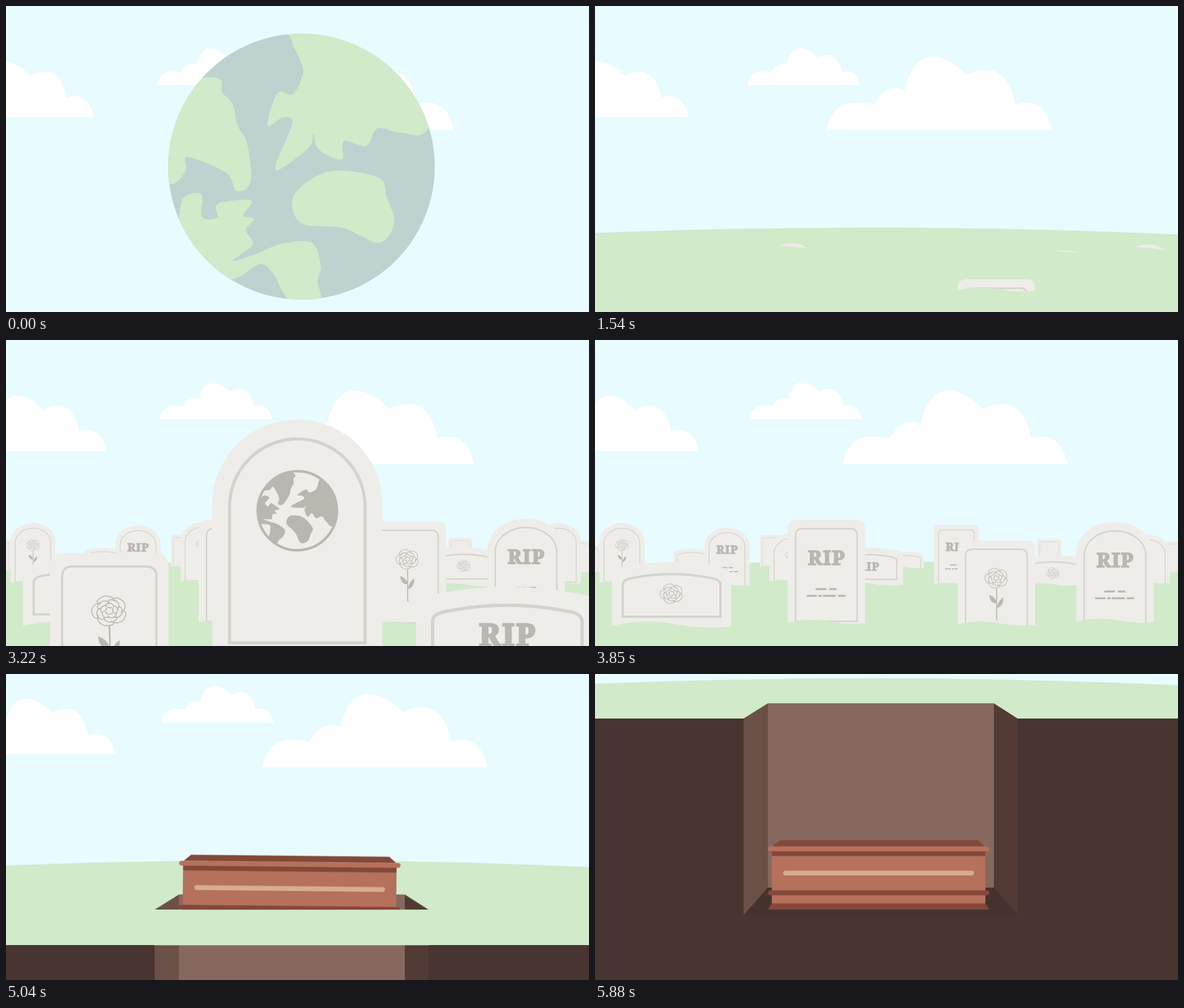
Recreate the animation shown at these times as an HTML page. Size 1032 px wide and 543 px high, loop 6.09 s.

```html
<!DOCTYPE html>
<html lang="en">
<head>
<meta charset="utf-8">
<title>Burial</title>
<style>
html, body { margin: 0; width: 100%; height: 100%; overflow: hidden; background: #e8fbff; }
svg { display: block; width: 100%; height: 100%; }
:root { --ease: cubic-bezier(.5, 0, .5, 1); }
.ground, .pan, .slide, .strip, .stone { animation: 6090ms var(--ease) infinite both; }
.ground { animation-name: ground; }
.pan { animation-name: pan; }
.slide { animation-name: slide; }
.strip { animation-name: strip; }
.back { animation-name: back; animation-delay: var(--wait); }
.front { animation-name: front; animation-delay: var(--wait); }
.drift { animation: drift 6090ms linear infinite; }
.coffin { animation: coffin 6090ms ease-out infinite; }
.rip { font: 700 35px "Noto Serif", "Liberation Serif", serif; letter-spacing: 2px; text-anchor: middle; fill: #b9b8b0; stroke: #b9b8b0; stroke-width: 2.2; }
.rose { fill: none; stroke: #b9b8b0; stroke-width: 1.1; }
.leaf { fill: #b9b8b0; stroke: none; }

@keyframes ground {
  0% { transform: translate(523px, 49px) scale(1) translate(0px, 236px) rotate(0deg); }
  20.69%, 76.8% { transform: translate(485px, 393.5px) scale(52) translate(0px, 236px) rotate(-35deg); }
  96.55%, 100% { transform: translate(485px, 8px) scale(52) translate(0px, 236px) rotate(-35deg); }
}
@keyframes pan {
  0%, 77.42% { transform: translateY(0); }
  96.55%, 100% { transform: translateY(var(--up)); }
}
@keyframes drift {
  0% { transform: translateX(0); }
  11.49% { transform: translateX(calc(var(--v) * 7px)); }
  37.93% { transform: translateX(calc(var(--v) * 24px)); }
  74.71% { transform: translateX(calc(var(--v) * 53px)); }
  100% { transform: translateX(calc(var(--v) * 74px)); }
}
@keyframes back {
  0%, 23.32% { transform: translateY(var(--d)); }
  30.21%, 61.08% { transform: translateY(0); }
  67.98%, 100% { transform: translateY(var(--d)); }
}
@keyframes front {
  0%, 33.09% { transform: translateY(var(--d)); }
  39.98%, 52.38% { transform: translateY(0); }
  59.28%, 100% { transform: translateY(var(--d)); }
}
@keyframes slide {
  0%, 71.35% { transform: translateX(-750px); }
  78.24%, 100% { transform: translateX(0); }
}
@keyframes strip {
  0%, 72.24% { opacity: 0; transform: translateY(472px) scaleY(73); }
  72.25%, 77.42% { opacity: 1; transform: translateY(472px) scaleY(73); }
  96.55%, 100% { opacity: 1; transform: translateY(79px) scaleY(0); }
}
@keyframes coffin {
  0%, 72.25% { transform: translate(502px, -90px) rotate(-3deg) scale(1.08); }
  74.71% { transform: translate(501.5px, 380px) rotate(-1.3deg) scale(1.06); animation-timing-function: ease-in-out; }
  82.76% { transform: translate(502px, 384px) rotate(.6deg) scale(1); animation-timing-function: linear; }
  87.36% { transform: translate(502px, 377.5px) rotate(.44deg) scale(1); }
  96.55%, 100% { transform: translate(502px, 356.5px) rotate(0deg) scale(1); }
}
</style>
</head>
<body>
<svg viewBox="0 0 1032 543" preserveAspectRatio="xMidYMid slice">
  <defs>
    <path id="cloud" fill="#fff" d="M0 0C6-32 24-48 48-49Q66-50 84-45C92-64 108-76 122-75Q132-75 139-71C145-105 162-131 187-131C210-131 232-115 249-98C262-106 276-107 286-107C314-106 328-78 334-46C342-49 350-50 358-49C382-46 394-24 399 0Z"/>
    <clipPath id="disc"><circle cx="523" cy="285" r="236"/></clipPath>
    <g id="lands" transform="translate(-523 -285)"><g id="coasts" clip-path="url(#disc)"></g></g>
    <g id="earth" transform="translate(0 6.6) scale(.135) rotate(40)" fill="#b9b8b0">
      <use href="#lands"/>
      <circle r="236" fill="none" stroke="#b9b8b0" stroke-width="15"/>
    </g>
    <path id="bloom" class="rose"/>
    <g id="rose" class="rose">
      <use href="#bloom"/>
      <path stroke-width="1.8" d="M0 18C2 35-1 50 1 75"/>
      <path class="leaf" d="M1 44C-2 34-8 31-13 30C-12 38-8 46 1 44ZM1 53C3 42 8 37 12 34C13 44 9 51 1 53Z"/>
    </g>
    <text id="word" class="rip" x="1" y="13">RIP</text>
    <g id="epitaph">
      <use href="#word"/>
      <path stroke="#b9b8b0" stroke-width="3.4" d="M-19 56H0M5 56H18M-35 68H-17M-14 68H-8M-6 68H17M21 68H34"/>
    </g>
  </defs>

  <rect width="1032" height="543" fill="#e8fbff"/>

  <g class="pan" style="--up:-400px">
    <g class="drift" style="--v:.64"><use href="#cloud" transform="translate(-143.5 197) scale(.75)"/></g>
    <g class="drift" style="--v:.11"><use href="#cloud" transform="translate(268 140.5) scale(.5)"/></g>
    <g class="drift" style="--v:1"><use href="#cloud" transform="translate(394 220.5)"/></g>
  </g>

  <g class="ground">
    <circle r="236" fill="#bed3cf"/>
    <use href="#lands" fill="#d1eac9"/>
  </g>

  <g class="pan" style="--up:-393px">
    <g class="slide">
      <path fill="#86685f" d="M306 445H706V472H306Z"/>
      <path fill="#6b5048" d="M263 472L306 445V472Z"/>
      <path fill="#523a35" d="M706 445L748 472H706Z"/>
    </g>
  </g>

  <g class="pan" style="--up:-466px">
    <rect y="545" width="1032" height="600" fill="#483431"/>
    <path fill="#6b5048" d="M263 545H306V845L263 894Z"/>
    <path fill="#86685f" d="M306 545H706V845H306Z"/>
    <path fill="#523a35" d="M706 545H748V894L706 845Z"/>
    <path fill="#45322e" d="M306 845H706L748 894H263Z"/>
  </g>

  <g class="coffin">
    <g transform="translate(-502 -356.5)" fill="#84483a">
      <path fill="#b5715b" d="M313 314H691V408H313Z"/>
      <path d="M327 295H678L690 306H314ZM313 314H691V323H313ZM313 407H691L698 418H306Z"/>
      <rect x="306" y="306" width="392" height="8.5" rx="4.2" fill="#b5715b"/>
      <rect x="333" y="349" width="338" height="8.5" rx="4.2" fill="#d8ac90"/>
      <rect x="306" y="384" width="392" height="8.5" rx="4.2"/>
    </g>
  </g>

  <rect class="strip" x="262" width="487" height="1" fill="#d1eac9"/>

  <g id="yard"></g>
</svg>
<script>
const $ = id => document.getElementById(id);

// Closed smooth curve through "x,y x,y ..." points
function blob(text) {
  const p = text.split(' ').map(s => s.split(',').map(Number)), n = p.length;
  let d = `M${p[0]}`;
  for (let i = 0; i < n; i++) {
    const [a, b, c, e] = [-1, 0, 1, 2].map(k => p[(i + k + n) % n]);
    const out = b.map((v, k) => v + (c[k] - a[k]) / 6);
    const into = c.map((v, k) => v - (e[k] - b[k]) / 6);
    d += `C${out} ${into} ${c}`;
  }
  return `<path d="${d}Z"/>`;
}

$('coasts').innerHTML = [
  '510,20 506,62 518,90 526,119 508,156 480,155 463,212 490,198 507,208 478,280 488,288 537,250 544,227 554,255 594,272 598,240 638,248 658,217 700,225 750,214 800,60',
  '346,128 380,131 382,152 401,174 410,212 427,245 433,312 408,328 390,296 322,268 318,293 293,316 250,300 280,150',
  '305,378 315,340 346,334 347,374 374,375 375,351 434,345 420,371 439,378 424,398 437,423 401,452 440,441 488,422 541,420 557,460 552,490 560,540 507,530 457,459 395,484 290,440',
  '507,345 535,311 584,292 660,305 674,340 687,385 660,420 597,394 524,386'
].map(blob).join('');

// Rose head: rings of five petals, each ring turned against the last
const polar = (r, turn) => [r * 1.15 * Math.cos(turn * 2 * Math.PI), r * Math.sin(turn * 2 * Math.PI)];
let petals = '';
for (let ring = 0; ring < 4; ring++) {
  const r = 17 - ring * 4.3;
  for (let i = 0; i < 5; i++) {
    const a = i / 5 + ring * .13;
    petals += `M${polar(r * .75, a)}Q${polar(r * 1.15, a)} ${polar(r * 1.05, a + .1)}Q${polar(r * 1.1, a + .18)} ${polar(r * .7, a + .23)}`;
  }
}
$('bloom').setAttribute('d', petals);

const dome = rise => (x, y, w, b) => `M${x} ${b}V${y + w * rise}a${w / 2} ${w * rise} 0 0 1 ${w} 0V${b}Z`;
const outline = {
  round: dome(.5),
  arch: dome(.4),
  slab: (x, y, w, b) => {
    const r = w * .11;
    return `M${x} ${b}V${y + r}q0 ${-r} ${r} ${-r}h${w - 2 * r}q${r} 0 ${r} ${r}V${b}Z`;
  },
  wide: (x, y, w, b) => `M${x} ${b}V${y + w * .11}Q${x} ${y + w * .055} ${x + w * .1} ${y + w * .04}` +
    `Q${x + w / 2} ${y - w * .04} ${x + w * .9} ${y + w * .04}Q${x + w} ${y + w * .055} ${x + w} ${y + w * .11}V${b}Z`
};

let count = 0;

// One headstone; every size follows from its scale k
function stone(k, near, kind, x, y, art) {
  const low = kind === 'wide', shape = outline[kind], i = count++;
  const w = (low ? 211 : 137) * k, h = (low ? 118 : 183) * k, b = y + h;
  const inset = w * (low ? .09 : .102), foot = w * (low ? .1 : .02);
  const travel = near ? (543 - y) * 1.1 : h + 8;
  const wait = near ? i * 85 : i % 3 * 70;
  const body = `<g class="stone ${near ? 'front' : 'back'}" style="--d:${travel}px;--wait:${wait}ms">
    <path fill="#eeede9" d="${shape(x, y, w, b + 50)}"/>
    <path fill="none" stroke="#d3d2cc" stroke-width="${w / 55}" d="${shape(x + inset, y + inset * 1.12, w - 2 * inset, b - foot)}"/>
    ${art ? `<use href="#${art}" transform="translate(${x + w / 2} ${y + (low ? 56 : 67) * k}) scale(${k})"/>` : ''}</g>`;
  if (near) return body;
  const turf = `M${x - 4} 0H${x + w + 4}V${b}q${-w / 4} ${w * .03} ${-w / 2} ${-w * .02}T${x - 4} ${b}Z`;
  return `<clipPath id="turf${i}"><path d="${turf}"/></clipPath><g clip-path="url(#turf${i})">${body}</g>`;
}

function row(k, near, ...list) {
  if (near && k < 2) count = 0;
  return list.map(s => stone(k, near, ...s)).join('');
}

$('yard').innerHTML =
  row(.31, false, ['slab', -33, 354], ['wide', 139, 369], ['slab', 292, 346], ['wide', 517, 368], ['slab', 783, 351], ['slab', 1010, 357]) +
  row(.58, false, ['wide', 749, 368, 'bloom'], ['wide', 423, 366, 'word'], ['arch', 8, 325, 'rose'], ['arch', 309, 323, 'rose'],
    ['arch', 194, 329, 'epitaph'], ['slab', 600, 328, 'epitaph'], ['arch', 938, 325]) +
  row(1, false, ['wide', 30, 390, 'bloom'], ['slab', 341, 319, 'epitaph'], ['slab', 642, 322, 'rose'], ['arch', 852, 317, 'epitaph']) +
  row(1.53, true, ['wide', 726, 437, 'epitaph'], ['slab', 78, 378, 'rose']) +
  row(2.2, true, ['round', 365, 141, 'earth']);
</script>
</body>
</html>
```
